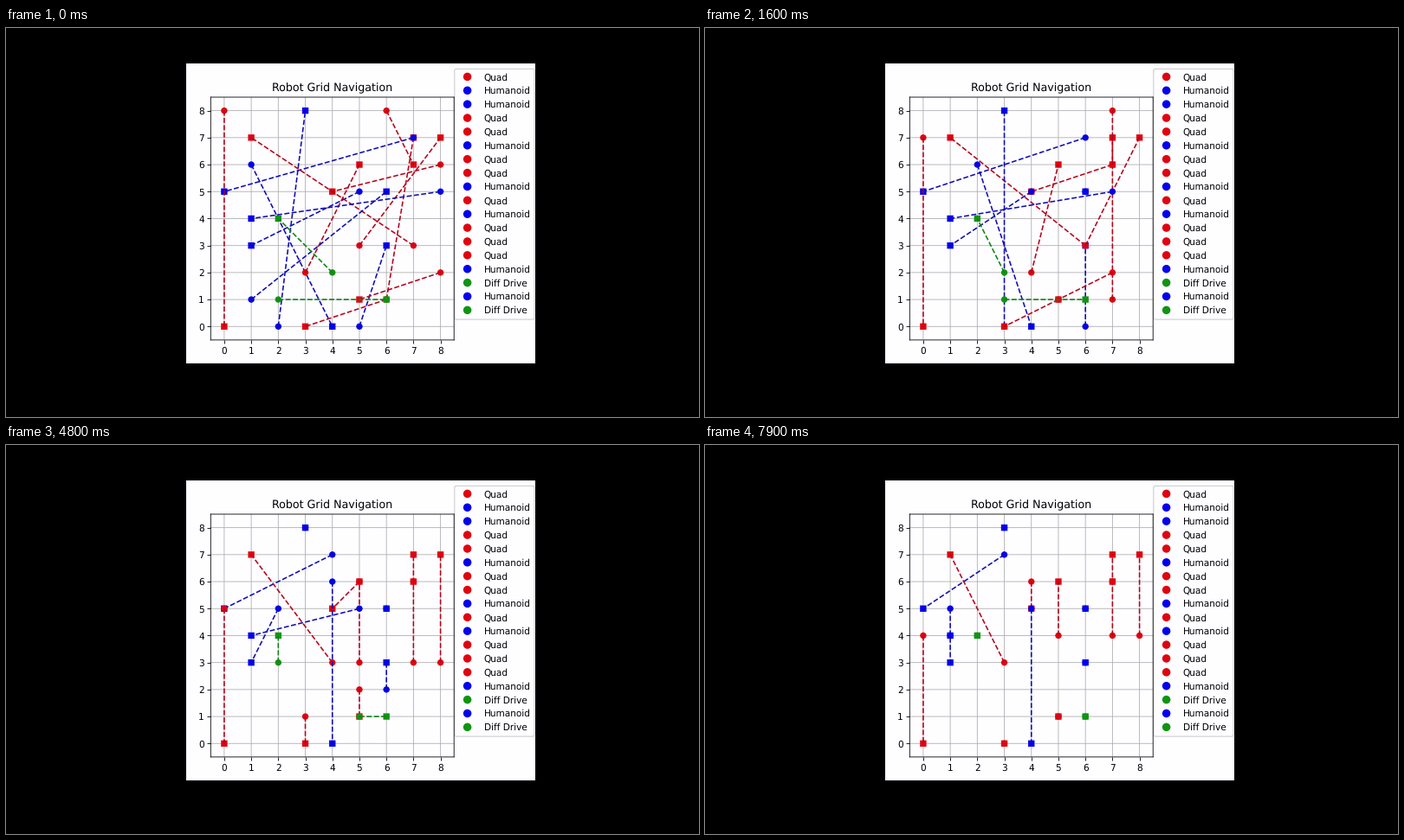
Animation of 800 by 450 pixels, one loop 8000 ms. Source, as a matplotlib script:

```python
import matplotlib.pyplot as plt
import numpy as np
from matplotlib.animation import FuncAnimation
from matplotlib.patches import Circle, FancyBboxPatch, Rectangle

W, H, DPI = 800, 450, 80
FRAMES, INTERVAL = 80, 100
PANEL = "#fefdff"
POINT = 0.76 * 100 / 72  # pixels on the stage per point of the plot
LEFT, TOP, SIDE = 236.3, 80, 280.9
CELL = SIDE / 9
NEVER = 99


def pt(size):
    """Points of the plot to points of the figure."""
    return size * POINT * 72 / DPI


# marker colour, line colour
KINDS = {
    "Quad": ("#df0410", "#b4041a"),
    "Humanoid": ("#0400ea", "#0e0cb6"),
    "Diff Drive": ("#109412", "#0e8414"),
}

# kind, start, goal, step at which a blocked robot jumps to its goal
ROBOTS = [
    ("Quad", (6, 1), (7, 7), NEVER),
    ("Humanoid", (7, 7), (0, 5), NEVER),
    ("Humanoid", (5, 0), (6, 3), NEVER),
    ("Quad", (0, 8), (0, 0), NEVER),
    ("Quad", (8, 6), (4, 5), NEVER),
    ("Humanoid", (5, 5), (1, 3), NEVER),
    ("Quad", (7, 3), (1, 7), NEVER),
    ("Quad", (6, 8), (7, 6), NEVER),
    ("Humanoid", (1, 6), (4, 0), NEVER),
    ("Quad", (5, 3), (8, 7), NEVER),
    ("Humanoid", (2, 0), (3, 8), 2),
    ("Quad", (6, 1), (3, 0), NEVER),
    ("Quad", (3, 2), (5, 6), NEVER),
    ("Quad", (8, 2), (5, 1), NEVER),
    ("Humanoid", (1, 1), (6, 5), 1),
    ("Diff Drive", (4, 2), (2, 4), NEVER),
    ("Humanoid", (8, 5), (1, 4), 4),
    ("Diff Drive", (2, 1), (6, 1), NEVER),
]


def position(start, goal, jump, step):
    """Walk one cell per step, along x first and then along y."""
    if step >= jump:
        return goal
    dx, dy = goal[0] - start[0], goal[1] - start[1]
    along_x = min(step, abs(dx))
    along_y = min(step - along_x, abs(dy))
    return (start[0] + int(np.sign(dx)) * along_x,
            start[1] + int(np.sign(dy)) * along_y)


plt.rcParams["font.family"] = "DejaVu Sans"
plt.rcParams["path.snap"] = False
plt.rcParams["text.hinting"] = "none"
fig = plt.figure(figsize=(W / DPI, H / DPI), dpi=DPI, facecolor="black")

# Stage in pixel coordinates: white panel, title and legend
stage = fig.add_axes([0, 0, 1, 1])
stage.set_xlim(0, W)
stage.set_ylim(H, 0)
stage.axis("off")
panel = Rectangle((208, 41), 403, 347, fc=PANEL, lw=0)
stage.add_patch(panel)
stage.text(LEFT + SIDE / 2, TOP - 6 * POINT, "Robot Grid Navigation",
           fontsize=pt(12), ha="center", va="baseline")

box = FancyBboxPatch((519.9, 49.4), 88, 285.6, fc=PANEL, ec="#cccccc",
                     lw=pt(1), boxstyle="round,pad=2.1,rounding_size=2.1")
stage.add_patch(box)
box.set_clip_path(panel)
for row, (kind, *_) in enumerate(ROBOTS):
    y = 56.4 + 15.88 * row
    stage.add_patch(Circle((532.6, y), 4.5 * POINT, fc=KINDS[kind][0], lw=0))
    stage.text(551.6, y + 3.8, kind, fontsize=pt(10), va="baseline")

# Grid
ax = fig.add_axes([LEFT / W, 1 - (TOP + SIDE) / H, SIDE / W, SIDE / H],
                  facecolor="none")
ax.set_xlim(-0.5, 8.5)
ax.set_ylim(-0.5, 8.5)
ax.set_xticks(range(9))
ax.set_yticks(range(9))
ax.tick_params(labelsize=pt(10), length=pt(3.5), width=pt(0.8), pad=pt(3.5))
ax.grid(color="#b0b0b0", lw=pt(0.8))
for spine in ax.spines.values():
    spine.set_linewidth(pt(0.8))

# Patches rather than markers, so that they are not rounded to whole pixels
radius = 3.5 * POINT / CELL
artists = []
for kind, start, goal, _ in ROBOTS:
    fill, stroke = KINDS[kind]
    body = Circle(start, radius, fc=fill, lw=0, zorder=2)
    corner = (goal[0] - radius, goal[1] - radius)
    target = Rectangle(corner, 2 * radius, 2 * radius, fc=fill, lw=0, zorder=2)
    route, = ax.plot([], [], "--", color=stroke, lw=pt(1.5))
    for order, artist in enumerate((body, target, route)):
        artist.set_zorder(2 + len(artists) + order / 3)
    ax.add_patch(body)
    ax.add_patch(target)
    artists.append((body, route))


def update(frame):
    step = (frame + 5) // 17
    for (_, start, goal, jump), (body, route) in zip(ROBOTS, artists):
        x, y = position(start, goal, jump, step)
        body.set_center((x, y))
        route.set_data([x, goal[0]], [y, goal[1]])
    return [artist for pair in artists for artist in pair]


anim = FuncAnimation(fig, update, frames=FRAMES, interval=INTERVAL,
                     init_func=lambda: update(0), repeat=True, repeat_delay=0)
plt.show()
```
